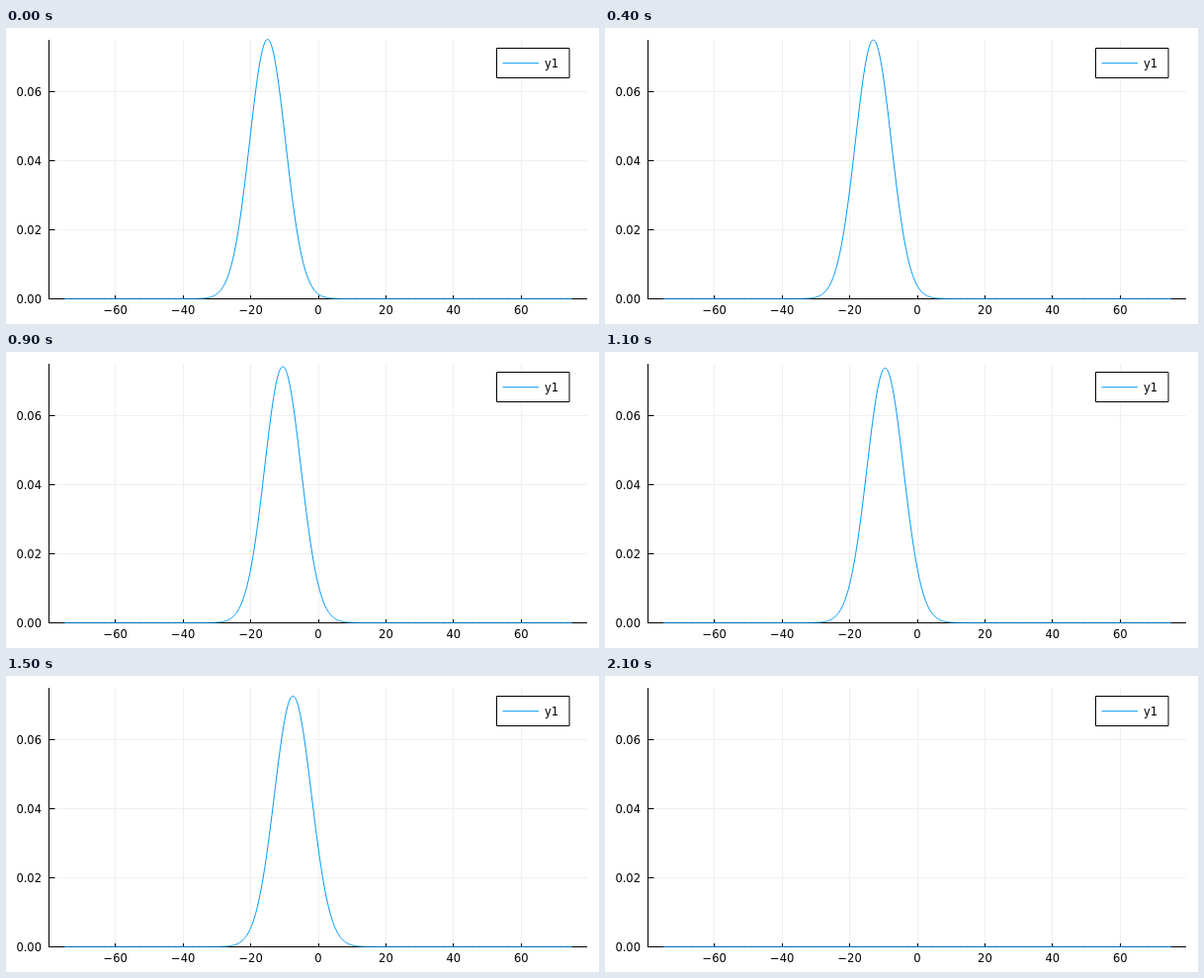
An HTML page with a canvas for the animation above (8200 ms loop, 600 by 300 pixels).

```html
<!DOCTYPE html>
<html lang="en">
<head>
<meta charset="utf-8">
<title>Spreading wave packet</title>
<style>
html, body { margin: 0; width: 100%; height: 100%; overflow: hidden; background: #fff; }
canvas { display: block; }
</style>
</head>
<body>
<canvas id="plot" width="600" height="300"></canvas>
<script>
const ctx = document.getElementById('plot').getContext('2d');
const LOOP = 8200, STEP = 100, LAST = 20;
const LEFT = 43.5, RIGHT = 588, TOP = 12, BASE = 274.5;
const BLUE = '#009af9';
const px = x => 316 + x * 3.4214;
const py = y => 274.4 - y * 3495;

function line(x1, y1, x2, y2, color) {
  ctx.strokeStyle = color;
  ctx.beginPath();
  ctx.moveTo(x1, y1);
  ctx.lineTo(x2, y2);
  ctx.stroke();
}

function label(text, x, y, align) {
  ctx.textAlign = align;
  ctx.fillText(text, x, y);
}

function drawAxes() {
  const crisp = v => Math.floor(v) + 0.5;
  const xs = [-60, -40, -20, 0, 20, 40, 60];
  const ys = [0, 0.02, 0.04, 0.06];
  ctx.lineWidth = 1;
  for (const x of xs) line(crisp(px(x)), TOP, crisp(px(x)), BASE, '#f0f0f0');
  for (const y of ys) line(LEFT, crisp(py(y)), RIGHT, crisp(py(y)), '#f0f0f0');

  line(LEFT, TOP, LEFT, BASE + 0.5, '#000');
  line(LEFT - 0.5, BASE, RIGHT, BASE, '#000');

  ctx.font = '11.5px "DejaVu Sans", sans-serif';
  ctx.fillStyle = '#000';
  for (const x of xs) {
    line(crisp(px(x)), BASE - 3.5, crisp(px(x)), BASE, '#000');
    label(String(x).replace('-', '\u2212'), px(x), 290, 'center');
  }
  for (const y of ys) {
    line(LEFT, crisp(py(y)), LEFT + 6, crisp(py(y)), '#000');
    label(y.toFixed(2), 36, Math.round(py(y) + 4.4), 'right');
  }
}

// Free Gaussian packet: drifts at constant speed while its width grows.
function density(x, n) {
  if (n > LAST) return 0;
  const a2 = 7.5 * 7.5;
  const w2 = a2 * (1 + (n / a2) ** 2);
  const d = x + 15 - 0.5 * n;
  return Math.exp(-d * d / w2) / Math.sqrt(Math.PI * w2);
}

function drawCurve(n) {
  ctx.strokeStyle = BLUE;
  ctx.lineWidth = 1;
  ctx.lineJoin = 'round';
  ctx.beginPath();
  for (let x = -75; x <= 75; x += 0.25) ctx.lineTo(px(x), py(density(x, n)));
  ctx.stroke();
}

function drawLegend() {
  ctx.fillStyle = '#fff';
  ctx.fillRect(497, 20, 73, 31);
  ctx.strokeStyle = '#000';
  ctx.strokeRect(496.5, 20.5, 73.5, 30);
  line(502.5, 35.7, 539, 35.7, BLUE);
  ctx.fillStyle = '#000';
  label('y1', 545, 40, 'left');
}

const start = performance.now();
function frame() {
  const t = (performance.now() - start) % LOOP;
  ctx.fillStyle = '#fff';
  ctx.fillRect(0, 0, 600, 300);
  drawAxes();
  drawCurve(Math.floor(t / STEP));
  drawLegend();
  requestAnimationFrame(frame);
}
frame();
</script>
</body>
</html>
```
